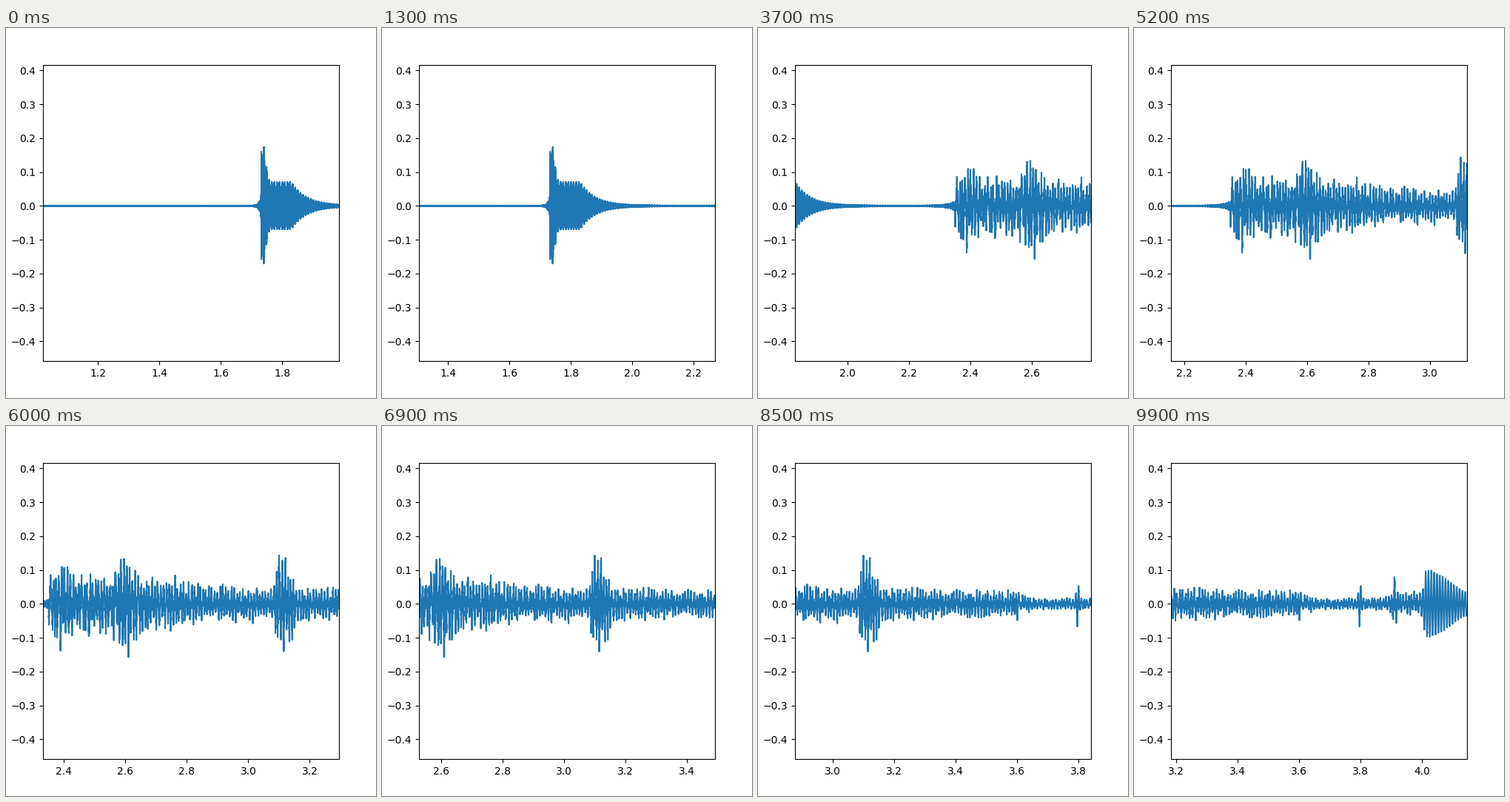
These frames come from a looping animation (500 px wide and 500 px high, 10 s). A matplotlib script:

```python
import numpy as np
import matplotlib.pyplot as plt
from matplotlib.animation import FuncAnimation

FRAMES = 100
START, STEP, SPAN = 1.0217, 0.02183, 0.9637
RATE = 16000
ATTACK, SPEECH = 1.7325, 2.35
HUM = 4.012

rng = np.random.default_rng(12)


def noise(t, low, high, parts=40):
    """Band-limited noise kept within -1..1."""
    total = sum(np.sin(2 * np.pi * (f * t + p))
                for f, p in zip(rng.uniform(low, high, parts), rng.random(parts)))
    return np.clip(total / (2.3 * total.std()), -1, 1)


def swell(t, centre, height, rise, fall):
    width = np.where(t < centre, rise, fall)
    return height * np.exp(-((t - centre) / width) ** 2)


def burst(t):
    """Sharp attack, held buzz and slow fade, then a faint lead-in to speech."""
    before = 0.04 * np.exp(np.minimum(t - ATTACK, 0) / 0.006)
    held = 0.07 * np.exp(-np.maximum(t - 1.83, 0) / 0.05)
    after = held + swell(t, 1.738, 0.11, 0.012, 0.012)
    lead = 0.013 * np.exp((t - SPEECH) / 0.025)
    size = np.where(t < ATTACK, before, after) + lead + 0.0013
    beat = 2 * np.pi * (t - ATTACK) / 0.0085
    pulse = (0.5 + 0.5 * np.cos(beat)) ** 3
    return size * (0.7 + 0.3 * pulse) * np.cos(12 * beat)


def speech(t):
    """Uneven pitch pulses over a noisy core, ending in a steady hum."""
    size = np.interp(t, [2.35, 2.65, 2.9, 3.55, 3.66, 3.85, 4.0],
                     [.08, .08, .046, .036, .014, .016, .035])
    for bump in [(2.4, .13, .04, .05), (2.6, .16, .05, .05),
                 (3.108, .14, .026, .05), (3.595, .055, .015, .015),
                 (3.795, .058, .004, .012), (3.908, .07, .008, .016),
                 (HUM, .095, .01, .125)]:
        size = np.maximum(size, swell(t, *bump))

    steady = np.clip((t - 3.99) / 0.015, 0, 1)
    phase = (t - HUM) / 0.0092 + 0.2 * (1 - steady) * noise(t, 10, 60)
    half = np.floor(2 * phase + 0.5).astype(int)
    gains = rng.uniform(0.4, 1, np.ptp(half) + 1)[half - half.min()]
    gains += steady * (1 - gains)
    wave = np.cos(2 * np.pi * phase)
    core = 0.38 * (1 - 0.8 * steady) * noise(t, 250, 1300)
    return size * (gains * wave * np.abs(wave) ** (1 - steady) + core)


t = np.arange(1.0, 4.2, 1 / RATE)
y = np.where(t < SPEECH, burst(np.minimum(t, SPEECH)), speech(t))

fig = plt.figure(figsize=(5, 5), dpi=100)
ax = fig.add_axes([0.1, 0.1, 0.8, 0.8])
ax.plot(t, y)
ax.set_ylim(-0.458, 0.4163)


def update(i):
    left = START + i * STEP
    ax.set_xlim(left, left + SPAN)
    return []


anim = FuncAnimation(fig, update, frames=FRAMES, interval=100,
                     repeat=True, repeat_delay=0, blit=False)
plt.show()
```
